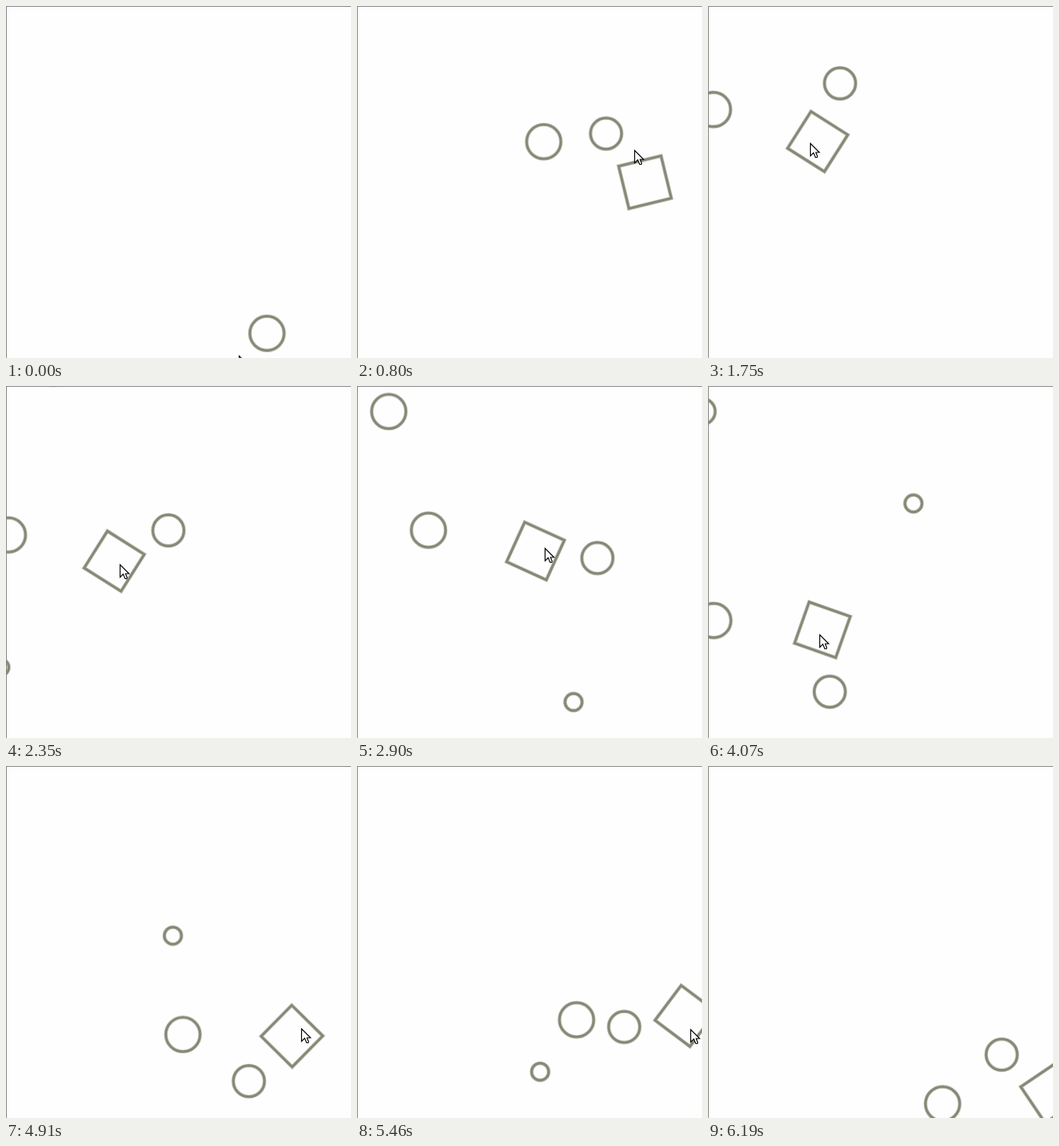
Animation of 443 by 452 pixels, one loop 6290 ms. Source, as an HTML page with a canvas:

```html
<!DOCTYPE html>
<html lang="en">
<head>
<meta charset="utf-8">
<title>Orbiting shapes</title>
<style>
  html, body { margin: 0; width: 100%; height: 100%; overflow: hidden; background: #fefefe; }
  canvas { display: block; }
</style>
</head>
<body>
<canvas id="stage" width="443" height="452"></canvas>
<script>
const LOOP = 6290, END = 6080;
const INK = '#888877', PAPER = '#fefefe', FRAME = '#858585';

// Short stalls hold the whole scene still
const stalls = [{ at: 1000, length: 40 }, { at: 4450, length: 70 }];

// Every part turns at a constant multiple of one spin (degrees per ms)
const SPIN = 0.0656, SPIN_ZERO = 2866;

// The pointer runs ahead of the square, enters from below and leaves on the right
const LEAD = 60, LEAVE = 5650;
const enter = { x: -157, y: -22, fade: 150 };

// Waypoints of the square: time, x, y
const waypoints = [
  [0, 461, 482],
  [650, 401, 359],
  [800, 370, 227],
  [1250, 263, 166],
  [1710, 141, 174],
  [2535, 168, 231],
  [2860, 229, 212],
  [3160, 288, 188],
  [3810, 198, 294],
  [4030, 147, 313],
  [4410, 230, 357],
  [4800, 367, 347],
  [5050, 391, 283],
  [5680, 445, 403],
  [6080, 440.5, 419.5]
];

const square = { side: 56, start: 25.2, rate: 2.28 };

// Each ring is 60 px further out than the one before
const circles = [
  { r: 20, start: 6.8, rate: 1 },
  { r: 22, start: 191, rate: -0.08 },
  { r: 11, start: 75.3, rate: -1.695 },
  { r: 22, start: 223.3, rate: -0.8 },
  { r: 16.5, start: 164, rate: 1.01 }
];
circles.forEach((c, i) => c.orbit = 80 + 60 * i);

const arrow = new Path2D('M0 0V16L4 12L6.5 18H8.5L9 16.5L7 11.5H11.5Z');
const ctx = document.getElementById('stage').getContext('2d');

const angleOf = (part, phase) => (part.start + part.rate * phase) * Math.PI / 180;

function sceneTime(ms) {
  let t = ms;
  for (const s of stalls) t -= Math.min(s.length, Math.max(0, ms - s.at));
  return Math.min(END, t);
}

function slope(i, axis) {
  const [a, b] = [waypoints[i], waypoints[i + 1]];
  return (b[axis] - a[axis]) / (b[0] - a[0]);
}

function tangent(i, axis) {
  const last = waypoints.length - 1;
  if (i === 0) return slope(0, axis);
  if (i === last) return slope(last - 1, axis);
  const before = waypoints[i][0] - waypoints[i - 1][0];
  const after = waypoints[i + 1][0] - waypoints[i][0];
  return (slope(i, axis) * before + slope(i - 1, axis) * after) / (before + after);
}

// Smooth curve through the waypoints
function follow(t, axis) {
  let i = 0;
  while (i < waypoints.length - 2 && t >= waypoints[i + 1][0]) i++;
  const [a, b] = [waypoints[i], waypoints[i + 1]];
  const h = b[0] - a[0], u = (t - a[0]) / h, v = 1 - u;
  return v * v * (1 + 2 * u) * a[axis] + u * u * (1 + 2 * v) * b[axis]
    + u * v * h * (v * tangent(i, axis) - u * tangent(i + 1, axis));
}

const speed = (t, axis) => (follow(t + 1, axis) - follow(t - 1, axis)) / 2;

function shapes(x, y, phase) {
  const path = new Path2D();
  for (const c of circles) {
    const a = angleOf(c, phase);
    const cx = x + c.orbit * Math.cos(a), cy = y + c.orbit * Math.sin(a);
    path.moveTo(cx + c.r, cy);
    path.arc(cx, cy, c.r, 0, 2 * Math.PI);
    path.closePath();
  }
  const box = new Path2D();
  box.rect(-square.side / 2, -square.side / 2, square.side, square.side);
  const turn = new DOMMatrix().translate(x, y).rotate(angleOf(square, phase) * 180 / Math.PI);
  path.addPath(box, turn);
  return path;
}

function drawPointer(x, y) {
  ctx.save();
  ctx.translate(Math.round(x) + 0.5, Math.round(y) + 0.5);
  ctx.fillStyle = '#fff';
  ctx.fill(arrow);
  ctx.lineWidth = 1.2;
  ctx.strokeStyle = '#000';
  ctx.stroke(arrow);
  ctx.restore();
}

function draw(ms) {
  const t = sceneTime(ms);
  const x = follow(t, 1), y = follow(t, 2);
  const path = shapes(x, y, SPIN * (t - SPIN_ZERO));

  ctx.fillStyle = PAPER;
  ctx.fillRect(0, 0, 443, 452);

  // A faint wide line under a solid one softens the edges
  ctx.strokeStyle = INK;
  ctx.globalAlpha = 0.4;
  ctx.lineWidth = 5;
  ctx.stroke(path);
  ctx.globalAlpha = 1;
  ctx.lineWidth = 3.2;
  ctx.stroke(path);

  if (t < LEAVE) {
    const k = Math.exp(-t / enter.fade);
    drawPointer(x + LEAD * speed(t, 1) + enter.x * k, y + LEAD * speed(t, 2) + enter.y * k);
  }

  ctx.fillStyle = FRAME;
  ctx.fillRect(0, 0, 443, 1);
  ctx.fillRect(0, 0, 1, 452);
}

const begin = performance.now();
function tick() {
  draw((performance.now() - begin) % LOOP);
  requestAnimationFrame(tick);
}
tick();
</script>
</body>
</html>
```
